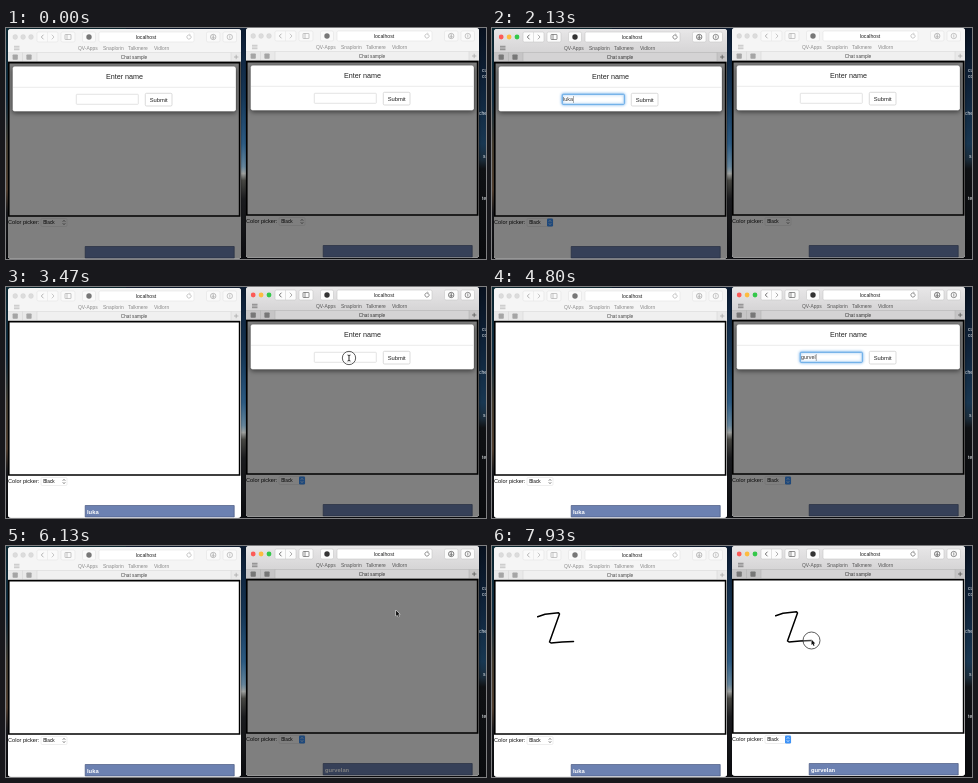
An HTML page with a canvas that plays this animation: 480x231 px, repeating every 8 s.

```html
<!DOCTYPE html>
<html lang="en">
<head>
<meta charset="utf-8">
<title>Chat sample</title>
<style>
html, body { margin: 0; width: 100%; height: 100%; overflow: hidden; background: #0a0b0e; }
canvas { display: block; width: 480px; height: 231px; }
</style>
</head>
<body>
<canvas id="stage"></canvas>
<script>
const W = 480, H = 231, LOOP = 8000, STEP = 200 / 3;
const dpr = window.devicePixelRatio || 1;
const canvas = document.getElementById('stage');
const layer = document.createElement('canvas');
for (const each of [canvas, layer]) {
  each.width = W * dpr;
  each.height = H * dpr;
}
const layerContext = layer.getContext('2d');
let c = canvas.getContext('2d');
const FONT = '"Liberation Sans", Arial, sans-serif';

const LEFT = { dx: 0, dy: 0, name: 'luka', focusAt: 730, blurAt: 3450, typeAt: 1600, typeGap: 140, pressAt: 2690, fadeAt: 2750, lag: 67 };
const RIGHT = { dx: 238, dy: -1, name: 'gurvelan', focusAt: 3450, blurAt: LOOP, typeAt: 4000, typeGap: 150, pressAt: 5800, fadeAt: 5890, lag: 0, spell: true };
const PEN_START = 7130, PEN_END = 7860;
const BOOKMARKS = [['QV-Apps', 72], ['Snaplorin', 97], ['Talkmere', 122], ['Vidlorn', 148]];

// Pen stroke in the right window's stage coordinates
const STROKE = [[283.7, 69.7], [291, 67.2], [304.5, 65.8], [305.5, 67], [300.5, 81], [295.5, 95], [297, 96], [308, 95], [319.5, 94.5]];

// Cursor way points: time, x, y
const MOVES = [
  [0, 130, 250], [230, 130, 250], [680, 112, 71], [1070, 114, 71], [2200, 114, 71],
  [2560, 154, 72], [2900, 154, 72], [3300, 343, 71], [5300, 343, 71], [5720, 399, 68],
  [6050, 399, 68], [6500, 300, 39], [6870, 285, 35], [7100, 283.7, 69.7]
];
const PRESSES = [[690, 800], [2690, 2760], [3450, 3590], [5800, 5880], [PEN_START, LOOP]];
const TYPING = [[1550, 2200], [3950, 5300]];

const clamp = v => Math.max(0, Math.min(1, v));
const ease = p => p * p * (3 - 2 * p);
const within = (t, spans) => spans.find(([a, b]) => t >= a && t < b);

function rect(x, y, w, h, fill, stroke, r = 0, lw = 0.6) {
  c.beginPath();
  c.roundRect(x, y, w, h, r);
  if (fill) { c.fillStyle = fill; c.fill(); }
  if (stroke) { c.strokeStyle = stroke; c.lineWidth = lw; c.stroke(); }
}

function disc(x, y, r, fill, stroke, lw = 0.7) {
  c.beginPath();
  c.arc(x, y, r, 0, 7);
  if (fill) { c.fillStyle = fill; c.fill(); }
  if (stroke) { c.strokeStyle = stroke; c.lineWidth = lw; c.stroke(); }
}

function line(points, color, lw) {
  c.beginPath();
  points.forEach(([x, y]) => c.lineTo(x, y));
  c.strokeStyle = color;
  c.lineWidth = lw;
  c.stroke();
}

function text(s, x, y, size, color, align = 'left', weight = '') {
  c.font = `${weight} ${size}px ${FONT}`;
  c.textAlign = align;
  c.fillStyle = color;
  c.fillText(s, x, y);
}

function vertical(y0, y1, stops) {
  const g = c.createLinearGradient(0, y0, 0, y1);
  stops.forEach(([p, color]) => g.addColorStop(p, color));
  return g;
}

// Paints on a separate layer so that overlapping parts fade as one
function faded(alpha, paint) {
  const main = c;
  layerContext.resetTransform();
  layerContext.clearRect(0, 0, layer.width, layer.height);
  layerContext.setTransform(main.getTransform());
  c = layerContext;
  paint();
  c = main;
  c.save();
  c.resetTransform();
  c.globalAlpha = alpha;
  c.drawImage(layer, 0, 0);
  c.restore();
}

function strokePart(p) {
  const lengths = STROKE.slice(1).map(([x, y], i) => Math.hypot(x - STROKE[i][0], y - STROKE[i][1]));
  let rest = p * lengths.reduce((a, b) => a + b);
  const out = [STROKE[0]];
  for (let i = 0; i < lengths.length && rest > 0; i++) {
    const k = Math.min(1, rest / lengths[i]);
    const [x, y] = STROKE[i], [nx, ny] = STROKE[i + 1];
    out.push([x + (nx - x) * k, y + (ny - y) * k]);
    rest -= lengths[i];
  }
  return out;
}

const penProgress = t => clamp((t - PEN_START) / (PEN_END - PEN_START));

function desktop() {
  rect(0, 0, 120, H, vertical(0, H, [
    [0, '#0b2a35'], [0.3, '#123249'], [0.5, '#4b4436'], [0.7, '#5a4635'], [0.8, '#191a1e'], [1, '#0a0b0e']
  ]));
  rect(120, 0, 240, H, vertical(0, H, [
    [0, '#0c1c33'], [0.3, '#173a5c'], [0.5, '#2f608a'], [0.6, '#6b8ca3'],
    [0.63, '#a5a8a6'], [0.66, '#4a4a46'], [0.74, '#1c1d20'], [1, '#0b0c10']
  ]));
  rect(360, 0, 120, H, vertical(0, H, [
    [0, '#08111f'], [0.25, '#0e2239'], [0.5, '#183752'], [0.57, '#1b2c3a'], [0.61, '#0f1114'], [1, '#0a0b0e']
  ]));
  [['cu', 476, 44], ['co', 476, 50], ['che', 473, 87], ['s', 477, 130], ['te', 476, 172]]
    .forEach(([s, x, y]) => text(s, x, y, 5, '#e8edf2'));
}

function toolbar(active) {
  const ink = active ? '#4c4c4c' : '#a3a3a3';
  const edge = active ? '#c6c6c6' : '#e2e2e2';
  const button = active ? '#fcfcfc' : '#fafafa';
  rect(2, 1, 233, 33, active ? vertical(1, 25, [[0, '#e8e7e8'], [1, '#d5d4d5']]) : '#f5f5f5');
  const lights = active ? ['#fc5b57', '#fdbc40', '#34c84a'] : ['#dcdcdc', '#dcdcdc', '#dcdcdc'];
  lights.forEach((color, i) => disc(9.2 + i * 7.9, 9, 2.4, color, active ? null : '#cfcfcf', 0.4));

  rect(31, 4, 21, 10, button, edge, 1.5);
  line([[41.5, 4], [41.5, 14]], edge, 0.5);
  line([[37.5, 6.7], [35.3, 9], [37.5, 11.3]], ink, 0.8);
  line([[45.8, 6.7], [48, 9], [45.8, 11.3]], active ? '#999' : '#bbb', 0.8);
  rect(55, 4, 14, 10, button, edge, 1.5);
  rect(59, 6.5, 6, 5, null, ink, 0.4, 0.6);
  line([[61, 6.5], [61, 11.5]], ink, 0.6);
  rect(76.5, 4, 13, 10, button, edge, 1.5);
  disc(83, 9, 2.7, active ? '#333' : '#777');

  rect(93, 4, 95, 10, '#fff', edge, 1.5);
  text('localhost', 140, 11, 5.2, '#222', 'center');
  c.beginPath();
  c.arc(183, 9, 2.1, -0.7, 4.7);
  c.strokeStyle = ink;
  c.lineWidth = 0.6;
  c.stroke();
  line([[183, 5.8], [184.4, 7], [183, 8]], ink, 0.5);

  rect(200.5, 4, 13.5, 10, button, edge, 1.5);
  disc(207.2, 9, 2.7, null, ink);
  line([[207.2, 7.2], [207.2, 10.5]], ink, 0.9);
  line([[206, 9.3], [207.2, 10.5], [208.4, 9.3]], ink, 0.8);
  rect(217, 4, 13.5, 10, button, edge, 1.5);
  disc(223.8, 9, 2.7, null, ink, 0.6);
  line([[223.8, 7.4], [223.8, 10.6]], ink, 0.6);

  [18.3, 20, 21.7].forEach(y => line([[8, y], [13.5, y]], ink, 0.6));
  BOOKMARKS.forEach(([s, x]) => text(s, x, 22, 4.9, active ? '#555' : '#8b8b8b'));

  rect(2, 24.5, 233, 9, active ? '#c6c5c6' : '#e9e9e9');
  rect(31, 24.5, 194, 9, active ? '#d4d3d4' : '#f0f0f0');
  line([[2, 24.5], [235, 24.5]], active ? '#b3b3b3' : '#d6d6d6', 0.5);
  [16.5, 31, 225].forEach(x => line([[x, 24.5], [x, 33.5]], active ? '#adadad' : '#d0d0d0', 0.5));
  [9.2, 23].forEach(x => rect(x - 2.6, 26.5, 5.2, 5.2, active ? '#777' : '#a5a5a5', null, 0.7));
  text('Chat sample', 128, 30.8, 4.7, active ? '#333' : '#444', 'center');
  line([[228, 29], [232.4, 29]], ink, 0.7);
  line([[230.2, 26.8], [230.2, 31.2]], ink, 0.7);
}

function page(win, t, active) {
  rect(2, 33.5, 233, 200, '#fff');
  rect(2.8, 34.6, 230.8, 153.4, '#fff', '#000', 0, 1.6);

  const drawn = penProgress(t - win.lag);
  if (drawn > 0) {
    c.save();
    c.translate(-238, 1);
    c.lineCap = c.lineJoin = 'round';
    line(strokePart(drawn), '#000', 1.5);
    c.restore();
  }

  text('Color picker:', 2, 196.3, 5.6, '#111');
  rect(35, 190.5, 26, 8, '#fff', '#dcdcdc', 1.2, 0.5);
  text('Black', 37.2, 196.3, 4.7, '#000');
  if (active) rect(55, 190.5, 6, 8, '#3f93f7', null, 1.2);
  const arrow = active ? '#fff' : '#444';
  line([[56.8, 193.7], [58, 192.4], [59.2, 193.7]], arrow, 0.7);
  line([[56.8, 195.3], [58, 196.6], [59.2, 195.3]], arrow, 0.7);

  rect(79.2, 218.5, 149, 11.5, '#6c81b1', '#4b5a82', 0, 0.7);
  if (t >= win.pressAt) text(win.name, 81, 227, 5.8, '#fff', 'left', 'bold');
}

function modal(win, t) {
  const pressed = t >= win.pressAt;
  const focused = t >= win.focusAt + 80 && !pressed;
  const lift = 8.5 * (1 - Math.pow(1 - clamp((t - win.fadeAt) / 300), 1.7));
  c.save();
  c.translate(0, -lift);

  c.save();
  c.shadowColor = 'rgba(0,0,0,.55)';
  c.shadowBlur = 5 * dpr;
  c.shadowOffsetY = 1.6 * dpr;
  rect(6.5, 38.3, 223.5, 45.2, '#fff', null, 2.2);
  c.restore();
  rect(6.5, 38.3, 223.5, 45.2, null, 'rgba(0,0,0,.3)', 2.2, 0.6);
  line([[7, 59.3], [229.5, 59.3]], '#e3e3e3', 0.7);
  text('Enter name', 118.5, 50.7, 7.2, '#222', 'center');

  c.save();
  if (focused) {
    c.shadowColor = 'rgba(82,158,232,.9)';
    c.shadowBlur = 3 * dpr;
  }
  rect(70.3, 66.3, 62, 10, '#fff', focused ? '#66aae6' : '#d9d9d9', 0.6, focused ? 1 : 0.7);
  c.restore();

  const typed = win.name.slice(0, Math.max(0, Math.floor((t - win.typeAt) / win.typeGap) + 1));
  text(typed, 71, 73.2, 5.4, '#333');
  const end = 71 + c.measureText(typed).width;
  if (win.spell && typed.length === win.name.length) {
    c.setLineDash([1, 0.6]);
    line([[71, 74.6], [end, 74.6]], '#e0435a', 0.9);
    c.setLineDash([]);
  }
  if (focused) line([[end + 0.6, 68], [end + 0.6, 75]], '#777', 0.6);

  rect(139.3, 65.3, 26.7, 12.7, pressed ? '#d9d9d9' : '#fff', pressed ? '#999' : '#ccc', 1.2, 0.7);
  text('Submit', 152.7, 73.8, 5.8, '#222', 'center');
  c.restore();
}

function browser(win, t) {
  const active = t >= win.focusAt && t < win.blurAt;
  c.save();
  c.translate(win.dx, win.dy);
  c.save();
  c.shadowColor = 'rgba(0,0,0,.5)';
  c.shadowBlur = 3 * dpr;
  rect(2, 1, 233, 229.8, '#fff', null, 3);
  c.restore();
  c.beginPath();
  c.roundRect(2, 1, 233, 229.8, 3);
  c.clip();
  toolbar(active);
  page(win, t, active);
  const dim = 0.5 * (1 - clamp((t - win.fadeAt - 300) / 150));
  if (dim) rect(2, 33.5, 233, 200, `rgba(0,0,0,${dim})`);
  const alpha = 1 - clamp((t - win.fadeAt) / 150);
  if (alpha) faded(alpha, () => modal(win, t));
  c.restore();
}

function cursorAt(t) {
  if (t >= PEN_START) return strokePart(penProgress(t)).pop();
  const i = MOVES.findIndex(m => m[0] > t);
  if (i < 0) return MOVES[MOVES.length - 1].slice(1);
  const [t0, x0, y0] = MOVES[i - 1], [t1, x1, y1] = MOVES[i];
  const k = ease((t - t0) / (t1 - t0));
  return [x0 + (x1 - x0) * k, y0 + (y1 - y0) * k];
}

function shape(points, fill, stroke) {
  c.beginPath();
  points.forEach(([x, y]) => c.lineTo(x, y));
  c.closePath();
  c.lineJoin = 'round';
  c.strokeStyle = stroke;
  c.lineWidth = 0.9;
  c.stroke();
  c.fillStyle = fill;
  c.fill();
}

function cursorKind(x, y, t) {
  for (const win of [LEFT, RIGHT]) {
    if (t > win.fadeAt + 200) continue;
    const px = x - win.dx, py = y - win.dy;
    if (py < 65 || py > 78) continue;
    if (px > 70 && px < 133) return 'beam';
    if (px > 139 && px < 166) return 'hand';
  }
  return 'arrow';
}

function cursor(t) {
  if (within(t, TYPING)) return;
  const [x, y] = cursorAt(t);
  const press = within(t, PRESSES);
  if (press) {
    const r = 6.4 + 2.1 * clamp((t - press[0]) / 130);
    disc(x, y, r, 'rgba(255,255,255,.25)', '#333', 0.8);
  }
  c.save();
  c.translate(x, y);
  const kind = cursorKind(x, y, t);
  if (kind === 'beam') {
    line([[0, -2.6], [0, 2.6]], '#111', 0.9);
    line([[-1.5, -3], [0, -2.5], [1.5, -3]], '#111', 0.8);
    line([[-1.5, 3], [0, 2.5], [1.5, 3]], '#111', 0.8);
  } else if (kind === 'hand') {
    shape([[-0.6, -2.5], [0.5, -2.5], [0.6, -0.2], [2.7, 0.4], [2.7, 2.4], [1.9, 4.5], [-0.9, 4.5], [-2.6, 1.4], [-1.9, 0.8], [-0.6, 1.8]], '#fff', '#111');
  } else {
    shape([[0, -1], [0, 4.6], [1.2, 3.5], [2.1, 5.4], [3, 5], [2.2, 3.1], [3.8, 3]], '#111', '#fff');
  }
  c.restore();
}

const origin = performance.now();

function draw() {
  const now = (performance.now() - origin) % LOOP;
  const t = Math.floor((now + 3.5) / STEP) * STEP % LOOP;
  c.setTransform(dpr, 0, 0, dpr, 0, 0);
  desktop();
  browser(LEFT, t);
  browser(RIGHT, t);
  cursor(t);
  requestAnimationFrame(draw);
}
draw();
</script>
</body>
</html>
```
